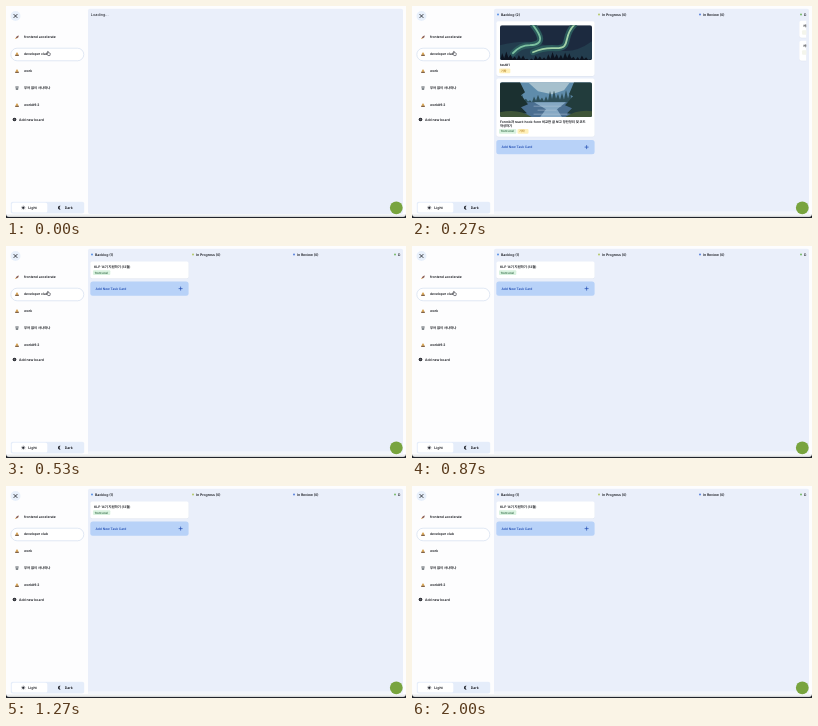
An HTML page for the animation above (2.07 s loop, 400 px wide and 212 px high).

```html
<!DOCTYPE html>
<html lang="ko">
<head>
<meta charset="utf-8">
<style>
html, body { margin: 0; width: 100%; height: 100%; overflow: hidden; background: #fdfdfe; }
svg { display: block; width: 400px; height: 212px; }
text { font: 600 3.4px Inter, "Noto Sans CJK KR", "Noto Sans CJK", sans-serif; fill: #15171d; text-rendering: geometricPrecision; }
</style>
</head>
<body>
<svg id="stage" viewBox="0 0 400 212"></svg>
<script>
const LOOP = 2070, LOADED = 270, SWITCHED = 330, CURSOR_GONE = 1070;

const rect = (x, y, w, h, fill, r = 0, extra = '') =>
  `<rect x="${x}" y="${y}" width="${w}" height="${h}" rx="${r}" fill="${fill}" ${extra}/>`;
const dot = (x, y, r, fill) => `<circle cx="${x}" cy="${y}" r="${r}" fill="${fill}"/>`;
const path = (d, fill, extra = '') => `<path d="${d}" fill="${fill}" ${extra}/>`;
const line = (d, color, width) => path(d, 'none', `stroke="${color}" stroke-width="${width}" stroke-linecap="round"`);
const text = (x, y, s, size = 3.35, style = '') =>
  `<text x="${x}" y="${y}" style="font-size:${size}px;${style}">${s}</text>`;
const at = (x, y, s, scale = 1) => `<g transform="translate(${x} ${y}) scale(${scale})">${s}</g>`;
const group = (id, s) => `<g id="${id}">${s}</g>`;

const rocket = line('M-1.3 1.4L-.3.4', '#e9a03b', 1) + path('M-1.3.2L.2-1.3 1.8-1.7 1.4 0-.2 1.4Z', '#8d6259');
const bell = path('M-1.5.8Q-1-1.9 0-1.9T1.5.8Z', '#dba95c') + rect(-1.9, .5, 3.8, 1.2, '#826449', .4);
const cup = rect(-1.7, -1.8, 3.4, 1.2, '#555b61', .3) + path('M-1.4-.4H1.4L1.1 1.8H-1.1Z', '#83898e');

function sidebar() {
  const boards = [[rocket, 'frontend accelerate'], [bell, 'developer club'], [bell, 'work'],
    [cup, '무어 없이 사나마나'], [bell, 'work#9.2']];
  return dot(9.5, 10, 5, '#e8f0fb') + line('M7.9 8.4l3.2 3.2m0-3.2l-3.2 3.2', '#15171d', .8) +
    rect(4.8, 42.2, 73, 12.6, '#fff', 6.3, 'stroke="#d3deef" stroke-width=".7"') +
    boards.map(([icon, name], i) => at(11, 31.2 + 17 * i, icon) + text(18, 32.4 + 17 * i, name)).join('') +
    dot(8.5, 113.5, 1.8, '#16181f') + line('M7.6 113.5h1.8m-.9-.9v1.8', '#fff', .2) + text(13, 114.8, 'Add new board', 3.4) +
    rect(4.8, 195.8, 73.4, 11.8, '#e5edfa', 2) + rect(5.8, 196.8, 35.5, 9.8, '#fff', 1.6) +
    dot(17.3, 201.7, 1, '#22252d') +
    line('M17.3 199.9v3.6m-1.8-1.8h3.6m-3.1-1.3l2.6 2.6m0-2.6l-2.6 2.6', '#22252d', .35) +
    text(22.3, 202.9, 'Light', 3.5) +
    path('M54.6 199.8a2 2 0 1 0 0 3.8 2.5 2.5 0 0 1 0-3.8Z', '#22252d') + text(58.7, 202.9, 'Dark', 3.5);
}

const header = (x, color, name) => dot(x, 8.6, 1, color) + text(x + 3, 9.8, name, 3.45);
const headers = count => header(86, '#5b93e8', `Backlog (${count})`) + header(187, '#b4c968', 'In Progress (0)') +
  header(288, '#5b82dc', 'In Review (0)') + `<g clip-path="url(#edge)">${header(389, '#78b96b', 'Done')}</g>`;
const card = (x, y, w, h) => rect(x, y + .5, w, h, '#dbe2ee', 2) + rect(x, y, w, h, '#fff', 2);
const tag = (x, y, w, name, fill, ink) => rect(x, y, w, 4.8, fill, 1) + text(x + 1.8, y + 3.4, name, 2.9, `fill:${ink}`);
const frontTag = (x, y) => tag(x, y, 17.3, 'front end', '#d9f2df', '#2b6640');
const etcTag = (x, y) => tag(x, y, 11, '기타', '#fff0b9', '#b68424');
const addButton = y => rect(84.3, y, 98.3, 14.2, '#b8d2f8', 2.5) +
  text(89.5, y + 8.2, 'Add New Task Card', 3.25, 'fill:#2450b4') +
  line(`M173 ${y + 7.1}h3.2m-1.6-1.6v3.2`, '#2450b4', .7);

// A row of firs whose heights follow two sine waves
function firs(base, height, fill, step) {
  let d = `M0 ${base}`;
  for (let x = 0; x < 92; x += step) {
    const h = height * (.65 + .2 * Math.sin(x * .41) + .25 * Math.cos(x * .11));
    d += `L${x + step / 2} ${base - h}L${x + step} ${base - h * .35}`;
  }
  return path(d + `L92 ${base}Z`, fill);
}
const picture = (y, s) => `<g transform="translate(88 ${y})" clip-path="url(#photo)">${s}</g>`;
const strand = (d, color) => line(d, '#2b5a5c', 6) + line(d, color, 1.8);
const aurora = picture(19.2,
  rect(0, 0, 92, 35, '#1c2a3f') + path('M0 35V20Q30 12 50 22T92 16V35Z', '#233d4e') +
  strand('M13 28Q20 20 30 20C46 19 40 9 33 0', '#7cc0a0') +
  strand('M33 27Q44 22 56 23C72 23 62 12 74 0', '#a3d3a8') +
  firs(36, 9, '#0d1420', 4.2));
const lake = picture(76.2,
  rect(0, 0, 92, 35, '#5f8cab') + path('M28 0H70L64 8 52 12 38 9Z', '#a6c0cd') +
  firs(21, 13, '#2e4f5a', 4) + rect(0, 20, 92, 15, '#4b6f91') +
  path('M34 20H66L57 27 62 35H40L46 27Z', '#86a9c4') +
  path('M0 0H20L25 10 21 13 28 22 21 25 27 31 0 35Z', '#1b3030') +
  path('M92 0H74L69 12 73 14 65 23 72 26 67 31 92 35Z', '#223c3c') +
  path('M0 30Q19 26 32 35H0ZM92 29Q77 27 65 35H92Z', '#3f5538') +
  line('M34 24H61M38 28H56M34 32H67', '#b3c5d6', .5));

const sliver = (y, h, name) => card(387.3, y, 20, h) + text(391, y + 6.3, name, 3.3) + rect(390, y + 9.5, 10, 4.5, '#f4f5ec', 1);
const firstBoard = headers(2) +
  card(84.3, 15.2, 98.3, 54.8) + aurora + text(88, 59.7, 'test#1', 3.3) + etcTag(87.3, 62.5) +
  card(84.3, 72.5, 98.3, 58.3) + lake +
  text(88, 116.8, 'Formik과 react-hook-form 비교한 글 보고 장단정리 및 코드', 3.3) +
  text(88, 121, '작성하기', 3.3) + frontTag(87, 123) + etcTag(105.5, 123) + addButton(134) +
  `<g clip-path="url(#edge)">${sliver(14.8, 17, '서류') + sliver(34.8, 20, '서비스')}</g>`;

const secondBoard = headers(1) + card(84.3, 15.5, 98.3, 17) +
  text(88, 21.9, 'KLP 14기 지원하기 (12월)', 3.3) + frontTag(87, 24.3) + addButton(35.5);

const scrollbar = rect(82, 205.3, 315, 2.7, '#f2f5fb', 1);
const hand = path('M-.8 2.4L-2 .4Q-2-.4-1.2.1V-2.1Q-.7-2.9-.3-2.1V-.7L1.5-.4Q2.1-.2 1.9.7L1.5 2.4Z', '#fff',
  'stroke="#22252d" stroke-width=".6"');

stage.innerHTML = `<clipPath id="photo">${rect(0, 0, 92, 34.8, '#000', 2)}</clipPath>
  <clipPath id="edge">${rect(380, 3, 14.3, 204, '#000')}</clipPath>
  <linearGradient id="shade" x2="0" y2="1"><stop stop-color="#fdfdfe"/><stop offset="1" stop-color="#e2e5e6"/></linearGradient>` +
  rect(0, 0, 400, 212, '#20232a') + rect(0, -5, 400, 215.8, '#fdfdfe', 3) +
  rect(1, 207.5, 398, 3.1, 'url(#shade)', 1) +
  sidebar() + rect(82, 2.8, 315, 205.2, '#eaeffa', 2) +
  group('loading', text(84.8, 10, 'Loading...', 3.8, 'font-weight:400')) +
  group('first', firstBoard + scrollbar) + group('second', secondBoard + scrollbar) +
  dot(390.3, 201.8, 6.4, '#78a43e') + group('cursor', at(42.6, 47.4, hand, .9));

const parts = ['loading', 'first', 'second', 'cursor'].map(id => document.getElementById(id));
const start = performance.now();
function draw() {
  const t = (performance.now() - start) % LOOP;
  const visible = [t < LOADED, t >= LOADED && t < SWITCHED, t >= SWITCHED, t < CURSOR_GONE];
  parts.forEach((part, i) => part.style.display = visible[i] ? '' : 'none');
  requestAnimationFrame(draw);
}
draw();
</script>
</body>
</html>
```
